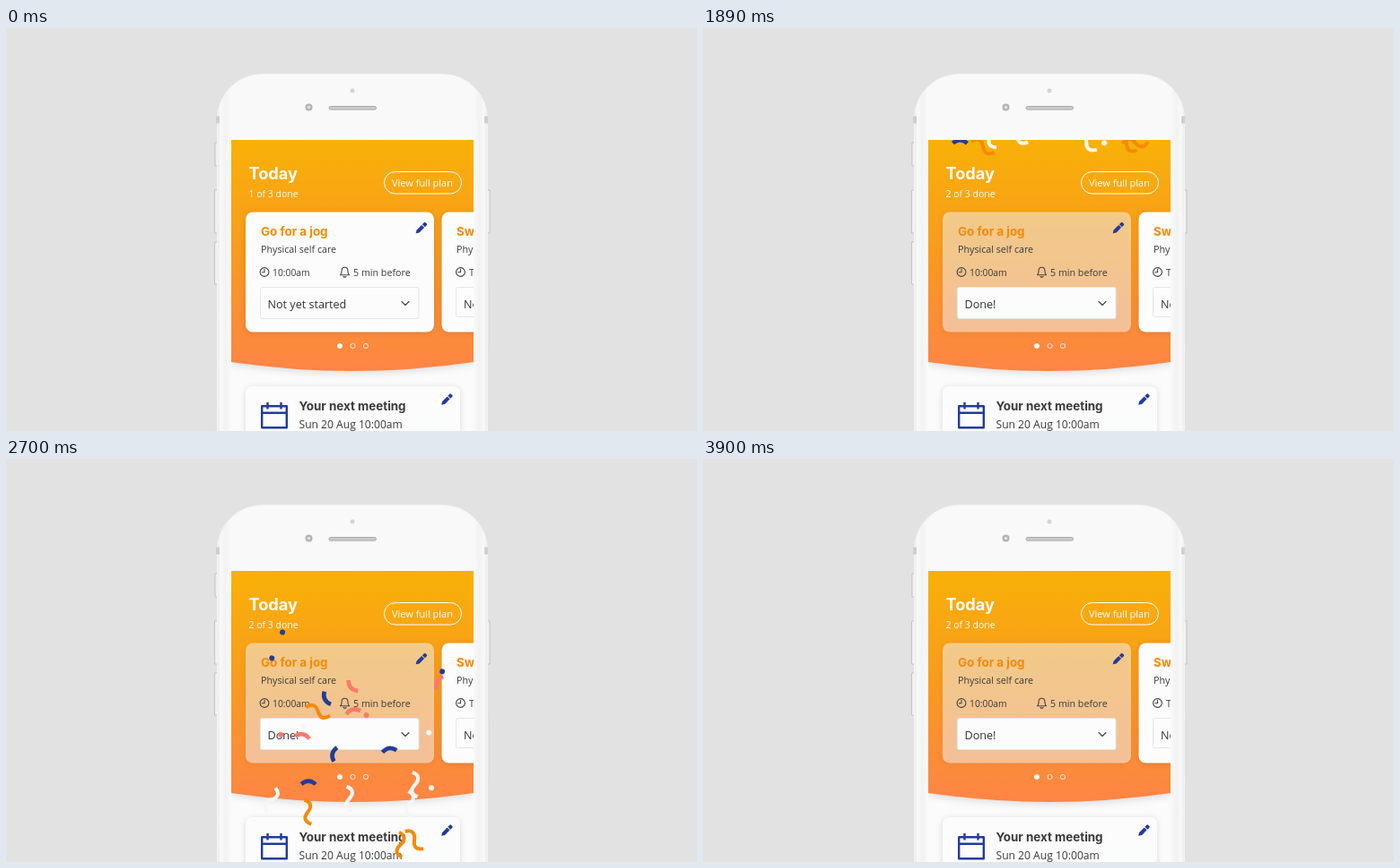
Animation, 770 px wide and 450 px high, one loop 4500 ms. Source, as an HTML page:

```html
<!DOCTYPE html>
<html lang="en">
<head>
<meta charset="utf-8">
<title>Daily plan</title>
<style>
  html, body { margin: 0; width: 100%; height: 100%; overflow: hidden; background: #e2e2e2; }
  svg { display: block; }
  text { font: 10.7px "Open Sans", "Noto Sans", sans-serif; fill: #3a3a3a; }
  .field { font-size: 12.6px; fill: #333; }
  .bold { font: 700 13.4px Inter, sans-serif; }
  .orange { fill: #f58a07; }
  .white { fill: #fff; }
  .line { fill: none; stroke: #444; stroke-width: 1.1; stroke-linecap: round; stroke-linejoin: round; }
  .card { fill: #fcfcfc; filter: drop-shadow(0 1px 3px #0002); }
  .box { fill: #fcfcfc; stroke: #e6e6e6; }
  #confetti path { fill: none; stroke-width: 4.6; }
</style>
</head>
<body>
<svg width="770" height="450" viewBox="0 0 770 450">
  <defs>
    <linearGradient id="sky" x2="0" y2="1">
      <stop stop-color="#f8b106"/><stop offset=".5" stop-color="#f99a20"/><stop offset="1" stop-color="#fd8546"/>
    </linearGradient>
    <linearGradient id="shell">
      <stop stop-color="#eaeaea"/><stop offset=".012" stop-color="#f9f9f9"/><stop offset=".03" stop-color="#f2f2f2"/>
      <stop offset=".05" stop-color="#f9f9f9"/><stop offset=".95" stop-color="#f9f9f9"/>
      <stop offset=".97" stop-color="#f2f2f2"/><stop offset=".988" stop-color="#f9f9f9"/><stop offset="1" stop-color="#eaeaea"/>
    </linearGradient>
    <clipPath id="screen"><path d="M251 125h270v325h-270z"/></clipPath>
    <clipPath id="reveal"><rect id="revealBox" x="280" y="324" width="190" height="0"/></clipPath>
    <g id="pencil" fill="#223c99" transform="rotate(-45)">
      <path d="M-8.3 0l3.5-2.1h7.8v4.2h-7.8zM4-2.1h2.8q1.3 0 1.3 1.2v1.8q0 1.2-1.3 1.2h-2.8z"/>
    </g>
    <g id="clock" class="line"><circle r="4.9"/><path d="M0-3v3.3h-2.8"/></g>
  </defs>

  <g fill="#f0f0f0" stroke="#b9b9b9" stroke-width=".8">
    <path d="M235 128h-2v26h2M235 181h-2.5v48h2.5M235 239h-2.5v47h2.5M537 181h2v48h-2"/>
    <path d="M537 290h1v66h-1" stroke="#d6d6d6"/>
  </g>
  <rect x="235.5" y="51.5" width="301" height="560" rx="50" fill="url(#shell)" stroke="#f3f3f3"/>
  <path d="M234 98.5h4v8h-4zM533 98.5h4v8h-4z" fill="#cfcfcf"/>
  <circle cx="386" cy="70" r="2.5" fill="#d4d4d4"/>
  <circle cx="337.5" cy="88.5" r="4" fill="#b4b4b4"/>
  <circle cx="337.5" cy="88.5" r="1.8" fill="#e2e2e2"/>
  <rect x="360" y="87.5" width="52.5" height="3.6" rx="1.8" fill="#cbcbcb" stroke="#aaa"/>

  <g clip-path="url(#screen)">
    <path d="M251 125h270v325h-270z" fill="#fbfbfb"/>
    <path d="M251 125h270V373Q386 393 251 373z" fill="url(#sky)" style="filter:drop-shadow(0 2px 4px #0002)"/>

    <text x="270.5" y="169" class="bold white" style="font-size:18.2px">Today</text>
    <text id="count" x="270.5" y="188.5" class="white" style="font-size:10.5px"></text>
    <rect x="421.5" y="160.5" width="86" height="24.5" rx="12.25" fill="none" stroke="#fff"/>
    <text x="430" y="177" class="white" style="font-size:11px">View full plan</text>

    <rect id="task" class="card" x="267" y="205.5" width="210" height="134" rx="8"/>
    <text x="284" y="231.5" class="bold orange">Go for a jog</text>
    <use href="#pencil" transform="translate(462.5 223.5)"/>
    <text x="284" y="251">Physical self care</text>
    <use href="#clock" transform="translate(288 272.5)"/>
    <text x="297" y="276.5" style="font-size:10.3px">10:00am</text>
    <path class="line" d="M372.5 275.7q1.6-1.3 1.6-4.7c0-5 6.8-5 6.8 0q0 3.4 1.6 4.7zM376 277.5q1.5 1.4 3 0"/>
    <text x="387" y="276.5">5 min before</text>

    <rect class="card" x="485.5" y="205.5" width="210" height="134" rx="8"/>
    <text x="502" y="231.5" class="bold orange">Swim</text>
    <text x="502" y="251">Physical</text>
    <use href="#clock" transform="translate(506.5 272.5)"/>
    <text x="516" y="276.5">Today</text>
    <rect class="box" x="501.5" y="289.5" width="177" height="33" rx="2"/>
    <text x="510" y="312.5" class="field">Not yet started</text>

    <g fill="none" stroke="#fff" stroke-width=".8">
      <circle cx="372" cy="355" r="2.6" fill="#fff"/>
      <circle cx="386.5" cy="355" r="2.6"/><circle cx="401" cy="355" r="2.6"/>
    </g>

    <rect class="card" x="267" y="400" width="239" height="110" rx="7"/>
    <path d="M285.2 422.2h27.6v24h-27.6zM285 429.8h28M291.5 418v7.5M306.5 418v7.5" fill="none" stroke="#223c99" stroke-width="2.4" stroke-linejoin="round"/>
    <text x="326.5" y="426.5" class="bold">Your next meeting</text>
    <text x="326.5" y="447" style="font-size:12.1px">Sun 20 Aug 10:00am</text>
    <use href="#pencil" transform="translate(491 415)"/>

    <g clip-path="url(#reveal)">
      <path d="M284 322h176.5v78.5h-176.5z" class="box"/>
      <path d="M292 363.5h159.5" stroke="#dedede"/>
      <text x="292" y="350" class="field">Doing</text>
      <text x="292" y="388.5" class="field">Done</text>
    </g>
    <rect id="select" class="box" x="283.5" y="289.5" width="176.5" height="35" rx="2"/>
    <text id="status" x="291.5" y="313" class="field"></text>
    <path id="chevron" class="line" d="M-4-2l4 4 4-4"/>

    <circle id="touch" r="23" fill="#c8c8c8"/>
    <g id="confetti"></g>
  </g>
</svg>

<script>
const LOOP = 4500, DONE_AT = 1770, BURST_MID = 2490, BURST_END = 3900;
const $ = id => document.getElementById(id);
const ramp = (t, from, to) => Math.min(1, Math.max(0, (t - from) / (to - from)));
const ease = k => k * k * (3 - 2 * k);
const set = (el, attrs) => { for (const k in attrs) el.setAttribute(k, attrs[k]); };

const COLORS = { o: '#f58a07', w: '#f6f6f6', b: '#223c99', c: '#fb7a6a' };
const SHAPES = {
  dot: 'M-3 0a3 3 0 1 1 6 0a3 3 0 1 1-6 0',
  arc: 'M-8 2.5Q0-4.5 8 2.5',
  wave: 'M-14 1C-10-7-4-5 0 0S9 7 14-1'
};
// look, x, y, x speed, y speed, angle at BURST_MID
const PIECES = [
  ['b dot', 311, 153, -14, 192], ['b dot', 291, 193, 25, 139],
  ['b dot', 487, 196, -4, 196], ['c dot', 399, 222, 12, 304],
  ['c dot', 311, 234, -22, 350], ['w dot', 333, 252, -8, 222],
  ['w dot', 486, 266, -70, 188], ['w dot', 467, 305, 33, 295],
  ['b arc', 338, 231, 86, 175, 180], ['b arc', 378, 273, -63, 267, 215],
  ['b arc', 408, 267, 90, 270, -80], ['b arc', 335, 293, 10, 320, -75],
  ['c arc', 378, 217, 33, 178, 165], ['c arc', 385, 234, 8, 221, -80],
  ['c arc', 477, 208, 20, 194, 225], ['c arc', 329, 255, 8, 253, -65],
  ['o wave', 349, 213, -6, 327, 10], ['o wave', 330, 326, 30, 323, 65],
  ['o wave', 448, 352, -40, 373, 75], ['o wave', 462, 348, -33, 367, 35],
  ['w wave', 302, 313, -30, 320, 100], ['w wave', 374, 312, 40, 320, 70],
  ['w wave', 444, 318, 28, 318, 75], ['w wave', 460, 295, -20, 325, 70]
].map(([look, x, y, vx, vy, angle = 0], i) => {
  const [color, shape] = look.split(' ');
  const el = document.createElementNS($('confetti').namespaceURI, 'path');
  set(el, { d: SHAPES[shape] });
  el.style[shape === 'dot' ? 'fill' : 'stroke'] = COLORS[color];
  if (shape === 'wave') el.style.strokeWidth = 4;
  $('confetti').append(el);
  return { el, x, y, vx, vy, angle, spin: shape === 'arc' ? 300 + 20 * (i % 4) : 60 };
});

function render(t) {
  const done = t >= DONE_AT;
  const open = done ? 0 : ease(ramp(t, 780, 1110));
  $('count').textContent = (done ? 2 : 1) + ' of 3 done';
  $('status').textContent = done ? 'Done!' : 'Not yet started';
  $('task').style.fillOpacity = 1 - 0.5 * ramp(t, DONE_AT, 1860);
  set($('revealBox'), { height: 78 * open });
  $('select').style.stroke = open > 0 ? '#2b45a0' : '';
  set($('chevron'), { transform: `translate(445 307.5) scale(1 ${1 - 2 * open})` });

  const second = t >= 1230;
  const touch = second
    ? ramp(t, 1200, 1320) * (1 - ramp(t, 1650, DONE_AT))
    : (t >= 630) * (1 - ramp(t, 810, 1020));
  set($('touch'), { cx: second ? 308 : 368, cy: second ? 382.5 : 306, opacity: 0.4 * touch });

  const s = (t - BURST_MID) / 1000;
  set($('confetti'), { opacity: done ? 1 - ramp(t, BURST_END - 250, BURST_END) : 0 });
  for (const p of PIECES) {
    set(p.el, { transform: `translate(${p.x + p.vx * s} ${p.y + p.vy * s}) rotate(${p.angle + p.spin * s})` });
  }
}

const start = performance.now();
function tick() {
  render((performance.now() - start) % LOOP);
  requestAnimationFrame(tick);
}
tick();
</script>
</body>
</html>
```
